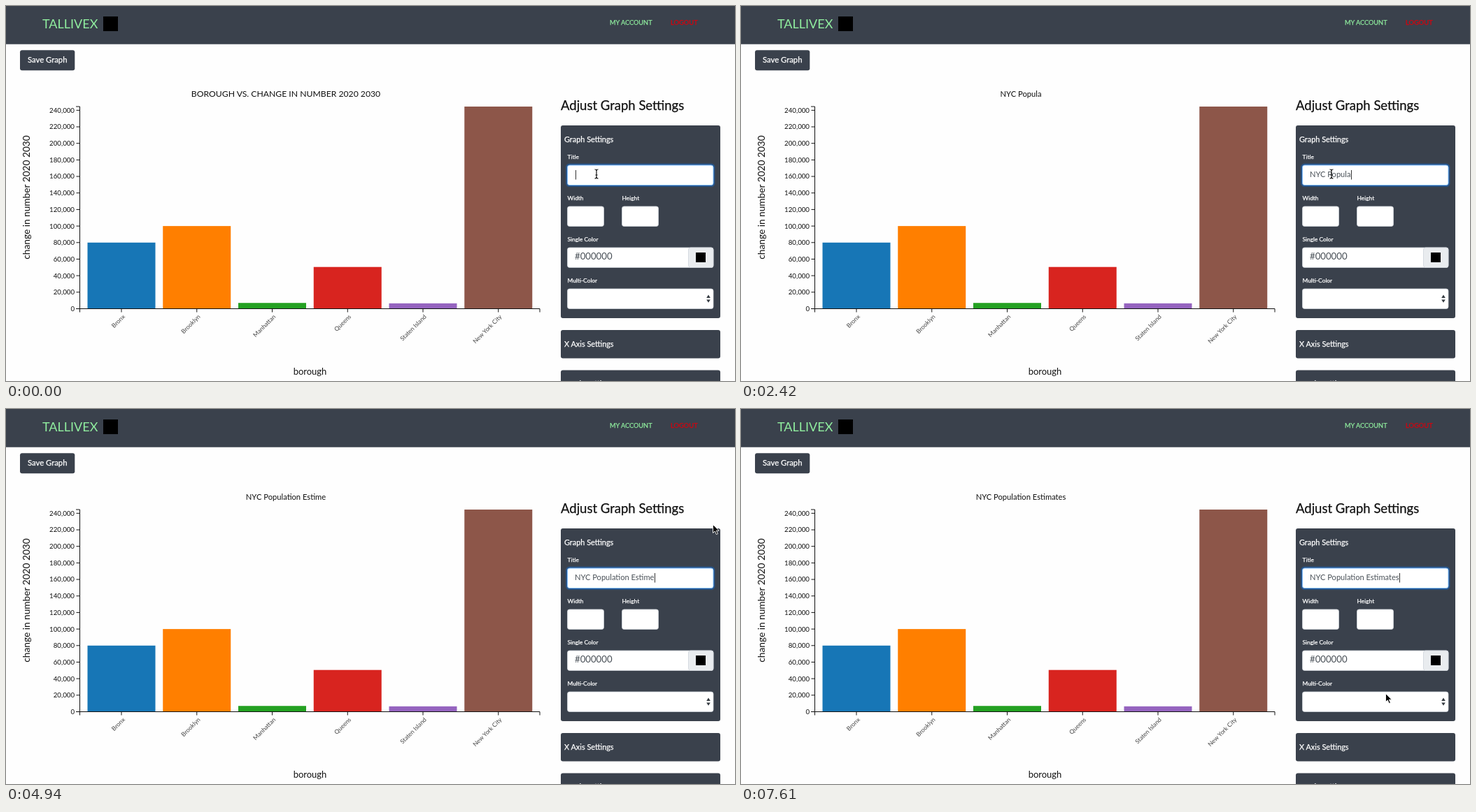
These frames come from a looping animation (1042 px wide and 537 px high, 8 s). An HTML page:

```html
<!DOCTYPE html>
<html lang="en">
<head>
<meta charset="utf-8">
<title>Graph settings</title>
<style>
  html, body { margin: 0; width: 100%; height: 100%; overflow: hidden; background: #fefefe; }
  svg { display: block; width: 100%; height: 100%; }
  text { font-family: Lato, "Open Sans", sans-serif; white-space: pre; }
  .medium { stroke: currentColor; stroke-width: .25px; }
</style>
</head>
<body>
<svg id="stage" viewBox="0 0 1042 537"></svg>
<script>
const DARK = '#3a414c', GREY = '#495057', GREEN = '#90ee9f', INK = '#111';
const END = 7610, LOOP = 8000;

const rect = (x, y, w, h, fill, r = 0, extra = '') =>
  `<rect x="${x}" y="${y}" width="${w}" height="${h}" fill="${fill}" rx="${r}" ${extra}/>`;
const text = (x, y, size, fill, content, extra = '') =>
  `<text x="${x}" y="${y}" font-size="${size}" fill="${fill}" color="${fill}" ${extra}>${content}</text>`;
const path = (d, extra) => `<path d="${d}" ${extra}/>`;
const medium = 'class="medium"', middle = 'text-anchor="middle"', right = 'text-anchor="end"';

function header() {
  return rect(0, 0, 1042, 54.7, DARK) +
    text(52, 32, 18, GREEN, 'TALLIVEX') +
    rect(139, 15, 21, 21, '#000') +
    text(863, 27, 9.2, GREEN, 'MY ACCOUNT', medium) +
    text(950, 27, 9.4, '#d9000c', 'LOGOUT', medium) +
    rect(20, 63.3, 78.3, 29, DARK, 3) +
    text(31, 80.5, 11.3, '#fff', 'Save Graph', medium);
}

function chart() {
  const left = 105.5, base = 433.5, band = 107.75, barWidth = 97;
  const data = {
    'Bronx': [80000, '#1776b6'], 'Brooklyn': [100000, '#ff7f00'],
    'Manhattan': [7000, '#24a122'], 'Queens': [50500, '#d8241f'],
    'Staten Island': [6500, '#9564bf'], 'New York City': [244500, '#8d5649']
  };
  const yOf = value => base - value * 0.001184;
  let out = '', axes = `M100 ${yOf(244500)}H${left}V${base}H100M${left} 438.5V${base}H763V438.5`;
  Object.entries(data).forEach(([name, [value, color]], i) => {
    const x = left + 11 + i * band, mid = x + barWidth / 2;
    out += rect(x, yOf(value), barWidth, base - yOf(value), color) +
      text(0, 0, 8.7, '#444', name, `${right} transform="translate(${mid + 5.5} 445.5) rotate(-45)"`);
    axes += `M${mid} ${base}v5`;
  });
  for (let value = 0; value <= 240000; value += 20000) {
    axes += `M100.5 ${yOf(value)}H${left}`;
    out += text(98, yOf(value) + 3.4, 9.7, INK, value.toLocaleString('en-US'), right);
  }
  return out + path(axes, `fill="none" stroke="${INK}"`) +
    text(434.5, 528, 13, INK, 'borough', middle) +
    text(0, 0, 13.7, INK, 'change in number 2020 2030', `${middle} transform="translate(34 274) rotate(-90)"`) +
    text(400, 129.5, 12.2, INK, '', `id="title" ${middle}`);
}

const FIELD = { x: 802.5, y: 228, w: 208.5, h: 28.5 };

function settings() {
  const border = 'stroke="#ced4da" stroke-width=".8"';
  const rowY = row => FIELD.y + row * 59;
  const field = (row, name, x = FIELD.x, w = FIELD.w, stroke = border) =>
    text(x, rowY(row) - 9, 8.4, '#fff', name, medium) + rect(x, rowY(row), w, FIELD.h, '#fff', 3, stroke);
  const panel = (y, h, name) =>
    rect(793, y, 228, h, DARK, 3) + text(798, y + 23.5, 10.9, '#fff', name, medium);

  return text(793, 148.5, 18.5, INK, 'Adjust Graph Settings', medium) +
    panel(171, 276, 'Graph Settings') +
    panel(464, 40.5, 'X Axis Settings') +
    panel(521.5, 40.5, 'Y Axis Settings') +
    rect(FIELD.x - 1.2, FIELD.y - 1.2, FIELD.w + 2.4, FIELD.h + 2.4, 'none', 4,
      'stroke="#007bff" stroke-opacity=".32" stroke-width="2.4"') +
    field(0, 'Title', FIELD.x, FIELD.w, 'stroke="#80bdff"') +
    field(1, 'Width', FIELD.x, 52) + field(1, 'Height', 880.5, 52) +
    field(2, 'Single Color') + rect(975.5, rowY(2), 35.5, FIELD.h, '#e9ecef', 3, border) +
    rect(986, 353, 14, 14, '#000') + text(813, 363, 13.2, GREY, '#000000') +
    field(3, 'Multi-Color') +
    path('M1001.2 418l2.8-4.4 2.8 4.4ZM1001.2 420.4h5.6l-2.8 4.4Z', 'fill="#343a40"') +
    text(813, 245, 11.1, GREY, '', 'id="entry"') +
    rect(0, 235, 1, 13.5, '#333', 0, 'id="caret"');
}

function pointers() {
  const beam = path('M-2.5-6.5Q0-6.5 0-4.5Q0-6.5 2.5-6.5M0-4.5V4.5M-2.5 6.5Q0 6.5 0 4.5Q0 6.5 2.5 6.5M-1.5 1.5h3',
    `id="beam" fill="none" stroke="${INK}" stroke-width="1.2"`);
  const arrow = path('M.5.5v12l2.8-2.6 2 4.7 2.1-.9-2-4.5h3.8Z', 'id="arrow" stroke="#fff" stroke-width=".9"');
  return beam + arrow;
}

// Each "<" is a backspace.
const STROKES = 'NYC Population Estimet<<ates';
// Pace of typing: [time, strokes made], steady in between.
const PACE = [[-390, 0], [230, 0], [1230, 4], [1680, 5], [3160, 15], [4050, 21], [4500, 23], [5540, 24], [6130, 28]];
// Pointer stops: [time, x, y], eased in between.
const STOPS = [[4500, 844, 240.5], [4930, 1010, 165], [5840, 1010, 165], [6120, 1021, 165], [6560, 866, 309], [7600, 921, 407]];

const linear = p => p, smooth = p => p * p * (3 - 2 * p);

// Reads column `to` where column `from` equals value.
function interpolate(keys, value, from, to, ease = linear) {
  if (value <= keys[0][from]) return keys[0][to];
  const i = keys.findIndex(key => key[from] >= value);
  if (i < 0) return keys.at(-1)[to];
  const a = keys[i - 1], b = keys[i];
  return a[to] + (b[to] - a[to]) * ease((value - a[from]) / (b[from] - a[from]));
}

const sampled = t => 40 + 148.3 * Math.floor((t - 40) / 148.3);

const stage = document.getElementById('stage');
stage.innerHTML = header() + chart() + settings() + pointers();
const [title, entry, caret, beam, arrow] =
  ['title', 'entry', 'caret', 'beam', 'arrow'].map(id => document.getElementById(id));

function drawTyping(t) {
  const count = Math.floor(interpolate(PACE, t, 0, 1) + 1e-6);
  const typed = [...STROKES.slice(0, count)]
    .reduce((line, key) => key === '<' ? line.slice(0, -1) : line + key, '');
  title.textContent = typed.trim() || 'BOROUGH VS. CHANGE IN NUMBER 2020 2030';
  title.setAttribute('font-size', typed ? 11.2 : 12.2);
  entry.textContent = typed;

  const idle = t - interpolate(PACE, count, 1, 0);
  caret.setAttribute('x', Math.round(813.5 + (typed && entry.getComputedTextLength())));
  caret.setAttribute('opacity', idle % 1060 < 530 ? 1 : 0);
}

function drawPointer(t) {
  const [x, y] = [1, 2].map(column => interpolate(STOPS, sampled(t), 0, column, smooth));
  const overField = x > FIELD.x && x < FIELD.x + FIELD.w && y > FIELD.y && y < FIELD.y + FIELD.h;
  beam.setAttribute('visibility', overField ? 'visible' : 'hidden');
  arrow.setAttribute('visibility', overField ? 'hidden' : 'visible');
  (overField ? beam : arrow).setAttribute('transform', `translate(${x} ${y})`);
}

const start = performance.now();
function tick() {
  const t = Math.min((performance.now() - start) % LOOP, END);
  drawTyping(t);
  drawPointer(t);
  requestAnimationFrame(tick);
}
tick();
</script>
</body>
</html>
```
